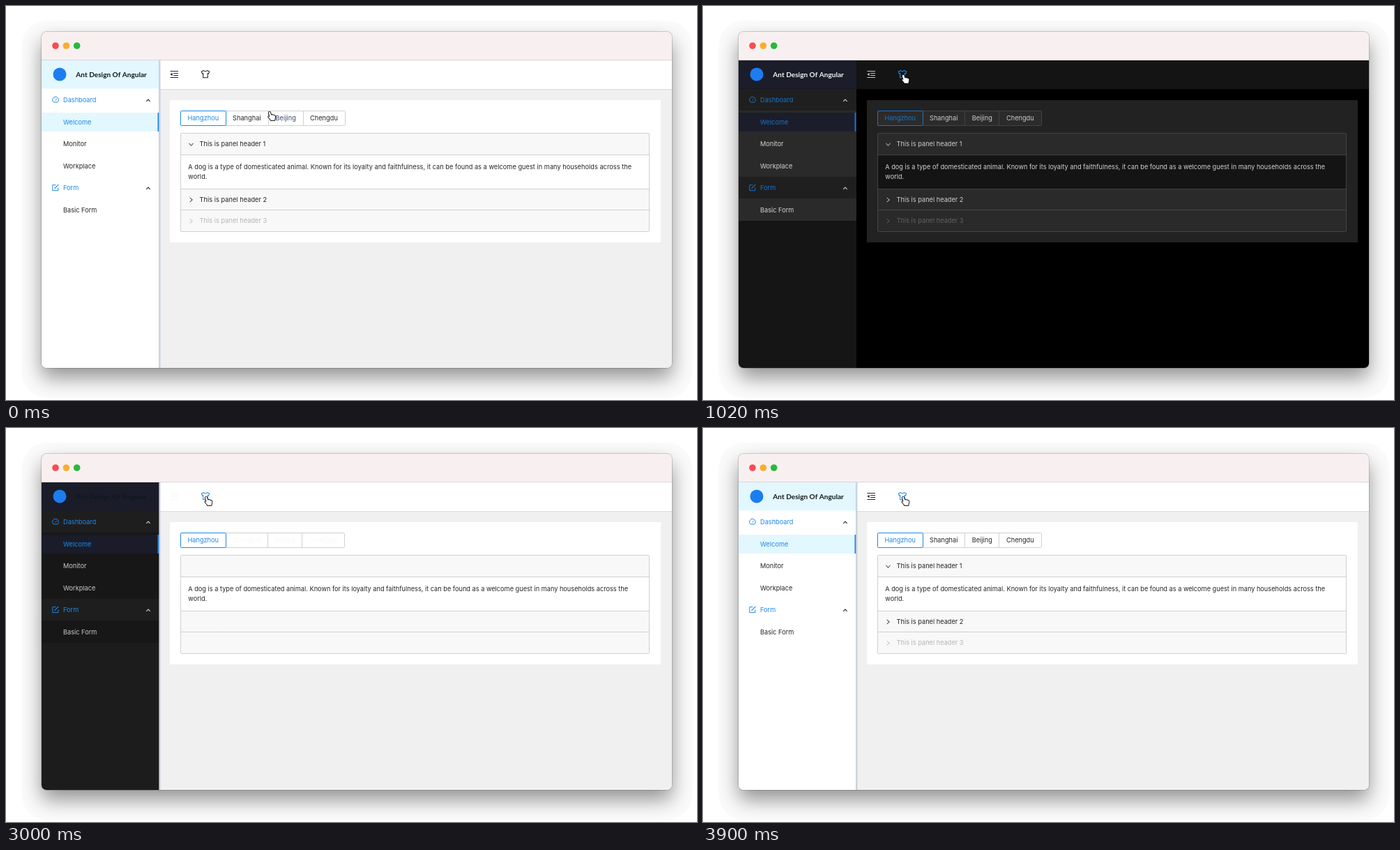
These frames come from a looping animation (991 px wide and 565 px high, 3.96 s). An HTML page with a canvas:

```html
<!DOCTYPE html>
<html lang="en">
<head>
<meta charset="utf-8">
<title>Theme switch</title>
<style>
  html, body { margin: 0; width: 100%; height: 100%; overflow: hidden; background: #fff; }
  canvas { display: block; }
</style>
</head>
<body>
<canvas id="stage" width="991" height="565"></canvas>
<script>
const ctx = document.getElementById('stage').getContext('2d');
const LOOP = 3960, STEP = 60;
const DARK_AT = 840, LIGHT_AT = 3000;

const UI_FONT = '9.2px Inter, sans-serif';
const BRAND_FONT = 'bold 10.1px Lato, sans-serif';

const INK = [[0, 0, 0, .86], [255, 255, 255, .8]];
const FAINT = [[0, 0, 0, .27], [255, 255, 255, .27]];
const SIDER = [[255, 255, 255, 1], [21, 21, 21, 1]];
const SELECTED = [[227, 247, 255, 1], [18, 20, 34, 1]];
const TAB_FILL = [[255, 255, 255, 1], [255, 255, 255, 0]];

const SHIRT = new Path2D('M-2.3-5Q0-2.2 2.3-5L5.7-3.6 4.7-.6 3.3-1V5.2H-3.3V-1L-4.7-.6-5.7-3.6Z');
const HAND = new Path2D('M-1.3 1.2C-1.5-.4 .8-.6 1.2 .8L2.2 4.4C3 3.6 4 3.9 4.3 4.6C5 4 6 4.3 6.2 5' +
  'C7.2 4.7 8 5.3 8.1 6.2C8.3 8 7.6 9.3 7.3 11.8H1.8C1 10-.6 8.6-1.7 7.2C-2 6.1-.8 5.9 .3 7Z');
const ARROW = new Path2D('M0 0V10.5L2.5 8.2 4.2 12 5.9 11.2 4.2 7.5H7.5Z');

const clamp = v => Math.min(1, Math.max(0, v));
const ease = v => v < .5 ? 4 * v ** 3 : 1 - 4 * (1 - v) ** 3;
const mix = (a, b, p) => a + (b - a) * p;
const blend = ([light, dark], p) =>
  `rgba(${light.map((v, i) => i < 3 ? Math.round(mix(v, dark[i], p)) : mix(v, dark[i], p)).join()})`;

// How far a part has faded to the dark theme, 0 to 1.
const darkness = (t, darkStart, lightStart, duration) =>
  ease(clamp((t - darkStart) / duration)) - ease(clamp((t - lightStart) / duration));

function box(x, y, x2, y2, color) {
  ctx.fillStyle = color;
  ctx.fillRect(x, y, x2 - x, y2 - y);
}

function frame(x, y, x2, y2, color, radius = 1) {
  ctx.strokeStyle = color;
  ctx.lineWidth = 1;
  ctx.beginPath();
  ctx.roundRect(x + .5, y + .5, x2 - x - 1, y2 - y - 1, radius);
  ctx.stroke();
}

function text(label, x, middle, color, font = UI_FONT) {
  ctx.font = font;
  ctx.fillStyle = color;
  ctx.fillText(label, x, middle + 3.4);
}

function disc(x, y, r, color) {
  ctx.fillStyle = color;
  ctx.beginPath();
  ctx.arc(x, y, r, 0, 7);
  ctx.fill();
}

function line(color, width, ...points) {
  ctx.strokeStyle = color;
  ctx.lineWidth = width;
  ctx.beginPath();
  points.forEach(([x, y]) => ctx.lineTo(x, y));
  ctx.stroke();
}

const chevronUp = (x, y, color) => line(color, 1.1, [x - 2.7, y + 1.5], [x, y - 1.3], [x + 2.7, y + 1.5]);
const chevronDown = (x, y, color) => line(color, 1, [x - 3, y - 1.8], [x, y + 1.8], [x + 3, y - 1.8]);
const chevronRight = (x, y, color) => line(color, 1, [x - 1.8, y - 3], [x + 1.8, y], [x - 1.8, y + 3]);

function shape(path, x, y, fill, stroke, width) {
  ctx.save();
  ctx.translate(x, y);
  ctx.strokeStyle = stroke;
  ctx.lineWidth = width;
  ctx.lineJoin = 'round';
  ctx.stroke(path);
  if (fill) {
    ctx.fillStyle = fill;
    ctx.fill(path);
  }
  ctx.restore();
}

function windowPath() {
  ctx.beginPath();
  ctx.roundRect(51, 37, 904, 482, 7);
}

function drawShadow() {
  ctx.fillStyle = '#fbfbfb';
  ctx.beginPath();
  ctx.roundRect(23, 21, 961, 541, 36);
  ctx.fill();
  ctx.save();
  ctx.shadowColor = 'rgba(0,0,0,.42)';
  ctx.shadowBlur = 29;
  ctx.shadowOffsetY = 14;
  ctx.fillStyle = '#fff';
  windowPath();
  ctx.fill();
  ctx.restore();
  ctx.strokeStyle = 'rgba(0,0,0,.22)';
  ctx.lineWidth = 1.4;
  windowPath();
  ctx.stroke();
}

function drawTitleBar() {
  box(51, 37, 955, 77, '#f8f0f0');
  box(51, 77, 955, 78, '#dcd6d6');
  disc(71, 57, 4.8, '#f94b52');
  disc(86.4, 57, 4.8, '#f6af2a');
  disc(101.7, 57, 4.8, '#27ba3c');
}

function drawSidebar(s) {
  const titleFill = blend(SIDER, s.fade);
  const itemFill = blend(SIDER, s.slow);
  const selected = blend(SELECTED, s.fade);
  const label = blend(INK, s.quick);
  const chevron = blend(INK, s.fade);

  box(51, 78, 220, 519, blend(SIDER, s.quick));
  box(51, 119, 220, 150, titleFill);
  box(51, 150, 220, 245, itemFill);
  box(51, 245, 220, 276, titleFill);
  box(51, 276, 220, 308, itemFill);
  box(51, 78, 220, 118.5, selected);
  box(51, 153, 220, 180, selected);
  box(217.5, 153, 219.5, 180, s.blue);

  disc(77, 98, 9.5, '#1c7df0');
  text('Ant Design Of Angular', 100.3, 98.7, s.dark ? '#f2f2f2' : '#10181d', BRAND_FONT);

  text('Dashboard', 82, 134.8, s.blue);
  text('Welcome', 82, 166.6, s.blue);
  text('Monitor', 82, 197.6, label);
  text('Workplace', 82, 229.2, label);
  text('Form', 82, 260.7, s.blue);
  text('Basic Form', 82, 292.4, label);
  chevronUp(204, 135.3, chevron);
  chevronUp(204, 261.3, chevron);

  // gauge and edit icons
  ctx.strokeStyle = s.blue;
  ctx.lineWidth = 1;
  ctx.beginPath();
  ctx.arc(71, 134.6, 4.3, .72 * Math.PI, .28 * Math.PI);
  ctx.closePath();
  ctx.stroke();
  line(s.blue, 1, [70.6, 135.4], [73, 132.8]);
  line(s.blue, 1, [71.5, 256.7], [66.8, 256.7], [66.8, 264.6], [74.8, 264.6], [74.8, 260.5]);
  line(s.blue, 1.2, [69.5, 261.9], [75.2, 256.2]);
}

function drawHeader(s) {
  box(220, 78, 955, 119, s.dark ? '#141414' : '#fff');
  if (!s.dark) {
    box(220, 119, 955, 120, '#dde1e7');
    box(220, 120, 955, 121, '#e9ebee');
    box(219.3, 78, 220.5, 519, '#b4bfd0');
    box(220.5, 78, 222, 519, 'rgba(190,202,220,.45)');
  }
  const ink = blend(INK, s.fade);
  line(ink, 1.1, [235.5, 93.5], [247, 93.5]);
  line(ink, 1.1, [240.2, 96.5], [247, 96.5]);
  line(ink, 1.1, [240.2, 99.5], [247, 99.5]);
  line(ink, 1.1, [235.5, 102.5], [247, 102.5]);
  ctx.fillStyle = ink;
  ctx.beginPath();
  ctx.moveTo(235.5, 98);
  ctx.lineTo(238.6, 95.7);
  ctx.lineTo(238.6, 100.3);
  ctx.fill();
  shape(SHIRT, 286, 97.5, null, s.onShirt ? '#1e8cf0' : ink, 1.1);
}

function drawTabs(s, border) {
  const edges = s.wide ? [315, 376, 426, 486] : [315, 375, 424, 485];
  const ink = blend(INK, s.fade);
  box(250, 150, edges[3], 171, blend(TAB_FILL, s.fade));
  frame(250, 150, edges[3] + 1, 172, border);
  box(edges[1], 151, edges[1] + 1, 171, border);
  box(edges[2], 151, edges[2] + 1, 171, border);
  frame(250, 150, edges[0] + 1, 172, s.blue);
  text('Hangzhou', 260.5, 161, s.blue);
  text('Shanghai', 325, 161, ink);
  text('Beijing', s.wide ? 386.5 : 385.7, 161, s.onTab ? '#37486c' : ink);
  text('Chengdu', s.wide ? 436 : 435, 161, ink);
}

function drawContent(s) {
  const border = s.dark ? '#434343' : '#d0d0d0';
  const bar = s.dark ? '#2a2a2a' : '#f8f8f8';
  const ink = blend(INK, s.fade), faint = blend(FAINT, s.fade);
  const body = s.dark ? '#d2d2d2' : '#262626';

  box(220, 119, 955, 519, s.dark ? '#000' : '#f0f0f0');
  box(235, 135, 939, 339, s.dark ? '#222' : '#fff');
  ctx.letterSpacing = s.wide ? '.035px' : '0px';
  drawTabs(s, border);

  box(250, 182, 923, 323, bar);
  box(250, 213, 923, 263, s.dark ? '#141414' : '#fff');
  [213, 262.5, 292.5].forEach(y => box(250, Math.floor(y), 923, Math.floor(y) + 1, border));
  frame(250, 182, 923, 324, border);

  chevronDown(265.5, 198.6, ink);
  text('This is panel header 1', 277.6, 197.7, ink);
  text('A dog is a type of domesticated animal. Known for its loyalty and faithfulness, ' +
    'it can be found as a welcome guest in many households across the', 261.3, 230.8, body);
  text('world.', 261.3, 244.7, body);
  chevronRight(265.5, 278, ink);
  text('This is panel header 2', 277.6, 277.8, ink);
  chevronRight(265.5, 308.4, faint);
  text('This is panel header 3', 277.6, 308, faint);
  ctx.letterSpacing = '0px';
}

function draw(t) {
  const travel = ease(clamp(t / 540));
  const pointer = { x: mix(378, 287.2, travel), y: mix(152, 99, travel) };
  const dark = t >= DARK_AT && t < LIGHT_AT;
  const state = {
    dark,
    quick: darkness(t, 790, 2960, 200),
    fade: darkness(t, 785, 2937, 300),
    slow: darkness(t, 815, 2965, 285),
    blue: dark && t > 900 ? '#1a72c8' : '#1e88e8',
    wide: t < DARK_AT,
    onTab: pointer.y > 150.5,
    onShirt: pointer.x < 303
  };

  ctx.fillStyle = '#fff';
  ctx.fillRect(0, 0, 991, 565);
  drawShadow();
  ctx.save();
  windowPath();
  ctx.clip();
  drawTitleBar();
  drawContent(state);
  drawSidebar(state);
  drawHeader(state);
  ctx.restore();

  if (state.onTab || state.onShirt) shape(HAND, pointer.x, pointer.y, '#fff', '#000', 1.8);
  else shape(ARROW, pointer.x, pointer.y, '#000', '#fff', 1.6);
}

const start = performance.now();
function tick() {
  const t = (performance.now() - start) % LOOP;
  draw(Math.floor(t / STEP) * STEP);
  requestAnimationFrame(tick);
}
tick();
</script>
</body>
</html>
```
